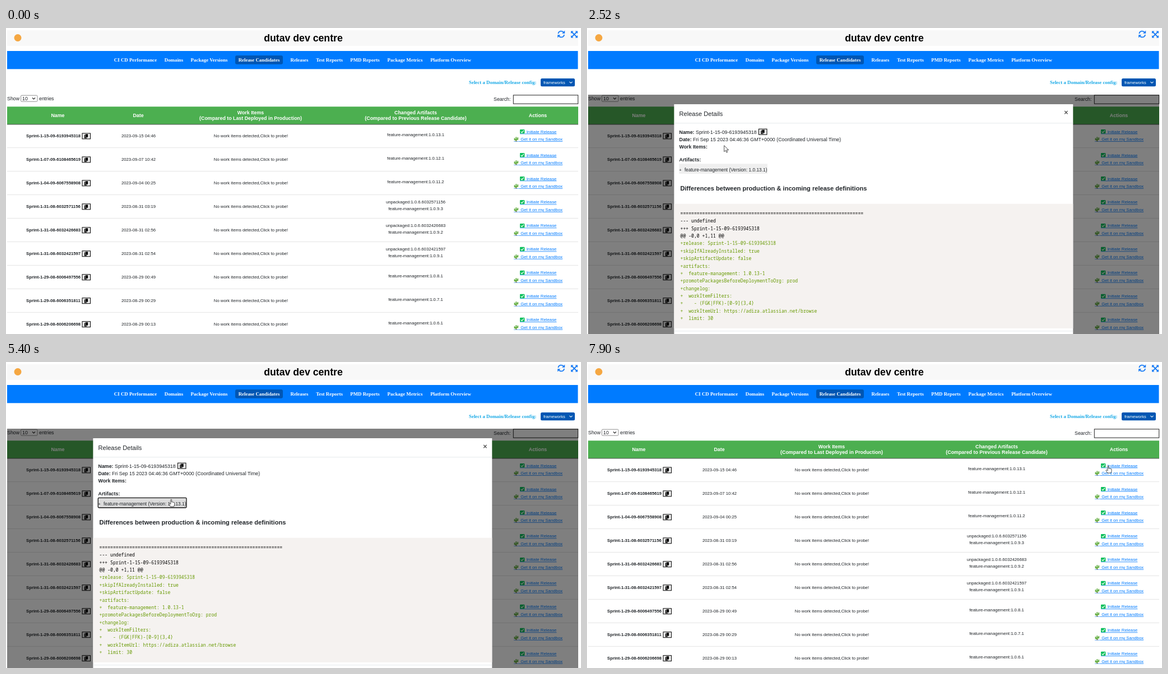
Recreate the animation shown at these times as an HTML page. Size 1026 by 546 pixels, loop 8000 ms.

```html
<!DOCTYPE html>
<html lang="en">
<head>
<meta charset="utf-8">
<title>Release candidates</title>
<style>
  html, body { margin: 0; width: 100%; height: 100%; overflow: hidden; background: #fff; }
  #stage { display: block; width: 100vw; height: 100vh; }
  text { font: 8.85px "Liberation Sans", Arial, sans-serif; fill: #212529; white-space: pre; }
  .bold { font-weight: bold; }
  .mid { text-anchor: middle; }
  .small { font-size: 7.74px; }
  .title { font-size: 17.7px; font-weight: bold; fill: #000; }
  .serif { font: bold 8.9px "Liberation Serif", Times, serif; }
  .white { fill: #fff; }
  .link { font-size: 7.8px; fill: #007bff; text-decoration: underline; }
  .large { font-size: 11.1px; }
  .notice { font-size: 13.34px; }
  .code { font: 8.15px "Noto Sans Mono", "DejaVu Sans Mono", monospace; fill: #000; }
  .added { fill: #690; }
</style>
</head>
<body>
<svg id="stage" viewBox="0 0 1026 546" xmlns="http://www.w3.org/2000/svg">
  <g id="page"></g>
  <svg id="frame" x="2" y="119" width="1019" height="427" viewBox="2 119 1019 427"></svg>
  <circle id="click" r="7.5" fill="#ffe600" opacity=".7"/>
  <path id="arrow" d="M0 0V11L2.6 8.7 4.3 12.5 6 11.7 4.4 8H8Z" fill="#fff" stroke="#222" stroke-width=".8"/>
  <path id="hand" d="M-.9 .6Q0-.5 .9 .6V5Q2 4.2 2.7 5.2 4 4.6 4.4 5.7 5.8 5.3 6 6.8V9.5L4.8 13H-1.2L-4 8.6Q-3.9 7.2-2.6 7.5L-.9 9Z" fill="#fff" stroke="#222" stroke-width=".8"/>
</svg>
<script>
const LOOP = 8000;
const $ = id => document.getElementById(id);
const text = (x, y, content, cls = "") =>
  `<text x="${x}" y="${y}" class="${cls}">${content.replace(/&/g, "&amp;")}</text>`;
const rect = (x, y, w, h, fill, more = "") =>
  `<rect x="${x}" y="${y}" width="${w}" height="${h}" fill="${fill}" ${more}/>`;
const path = (d, stroke, width, more = "") =>
  `<path d="${d}" fill="none" stroke="${stroke}" stroke-width="${width}" ${more}/>`;
const at = (x, y, content) => `<g transform="translate(${x} ${y})">${content}</g>`;
const chevron = (x, y, color) => path(`M${x - 2.5} ${y - 1.2}l2.5 2.5 2.5-2.5`, color, 1.1);

const copyButton = (x, y) => at(x, y,
  rect(.5, .5, 14.5, 10, "#efefef", 'stroke="#000"') +
  rect(4.3, 3, 4.5, 6.4, "#000", 'rx=".6"') +
  rect(6, 1.6, 5, 6.2, "#000", 'rx=".6" stroke="#efefef" stroke-width=".6"'));

const check = (x, y) => at(x, y,
  rect(0, 0, 8.4, 7.6, "#0bbf5b", 'rx="1"') + path("M1.7 3.9L3.5 5.8 6.9 1.7", "#fff", 1.2));

const cactus = (x, y) => at(x, y,
  path("M4.3 7.4V1M4.3 5.4H1.5V3M4.3 4.6H7.2V1.8", "#55a630", 1.7, 'stroke-linecap="round"') +
  path("M2.6 7.8H6", "#b98a4a", 1.2));

const NAV = [["CI CD Performance", 231], ["Domains", 299.5], ["Package Versions", 362.5],
  ["Release Candidates", 451.5], ["Releases", 523.5], ["Test Reports", 577],
  ["PMD Reports", 640.5], ["Package Metrics", 712], ["Platform Overview", 793.5]];

// sprint day, run id, date, package version, unpackaged build present
const ROWS = [
  ["15-09", "6193945318", "09-15 04:46", "13.1"],
  ["07-09", "6108465619", "09-07 10:42", "12.1"],
  ["04-09", "6067558908", "09-04 00:25", "11.2"],
  ["31-08", "6032571156", "08-31 03:19", "9.3", true],
  ["31-08", "6032426683", "08-31 02:56", "9.2", true],
  ["31-08", "6032421597", "08-31 02:54", "9.1", true],
  ["29-08", "6006497556", "08-29 00:49", "8.1"],
  ["29-08", "6006351811", "08-29 00:29", "7.1"],
  ["29-08", "6006206698", "08-29 00:13", "6.1"]];

function tableRow([day, id, date, version, unpackaged], i) {
  const feature = "feature-management:1.0." + version;
  const artifacts = unpackaged
    ? text(731, 122 - 7.2, "unpackaged:1.0.6." + id, "small mid") + text(731, 127.2, feature, "small mid")
    : text(731, 121, feature, "small mid");
  return at(0, 72.4 + 41.97 * i,
    text(36, 123, `Sprint-1-${day}-${id}`, "small bold") + copyButton(135.5, 115) +
    text(236.5, 122.6, "2023-" + date, "small mid") +
    text(437, 122.6, "No work items detected,Click to probe!", "small mid") + artifacts +
    check(917, 108.6) + text(926.5, 115.2, " Initiate Release", "link") +
    cactus(906, 121.6) + text(916, 128.6, " Get it on my Sandbox", "link") +
    path("M906 130H916M917 116.6H927", "#007bff", .6) +
    path("M2 141.2H1021", "#ddd", .8));
}

function page() {
  const sync = path("M-5.3-.8A5.3 5.3 0 0 1 4.4-3M5.3 .8A5.3 5.3 0 0 1-4.4 3", "#1a7cf5", 1.8) +
    '<path d="M6.5-6.5V-1.3H1.3ZM-6.5 6.5V1.3H-1.3Z" fill="#1a7cf5"/>';
  const expand = path("M-4.5-4.5L4.5 4.5M-4.5 4.5L4.5-4.5", "#1a7cf5", 1.8) +
    '<path d="M-6-6H-1.5L-6-1.5ZM6-6V-1.5L1.5-6ZM-6 6V1.5L-1.5 6ZM6 6H1.5L6 1.5Z" fill="#1a7cf5"/>';
  return rect(2, 4, 1019, 28, "#f8f8f8") +
    '<circle cx="21" cy="17.5" r="6.5" fill="#f5a742"/>' +
    text(530.5, 24, "dutav dev centre", "title mid") + at(990.7, 11, sync) + at(1014, 11.5, expand) +
    rect(2, 41, 1018.5, 32.3, "#007bff") + rect(409, 49, 85, 15.7, "#0056b3", 'rx="3"') +
    NAV.map(([label, x]) => text(x, 60, label, "serif white mid")).join("") +
    `<text x="826" y="100" class="serif" style="fill:#17a9e6">Select a Domain/Release config:</text>` +
    rect(954, 90, 61, 14.2, "#0056b3", 'rx="2.5"') +
    `<text x="959" y="99.8" class="white" style="font-size:7.5px">frameworks</text>` + chevron(1008, 97, "#fff") +
    text(2, 129, "Show") + rect(26.5, 120.2, 29.5, 11, "#fff", 'rx="1.5" stroke="#767676" stroke-width=".8"') +
    text(29, 129, "10") + chevron(49.5, 125.7, "#222") + text(59, 129, "entries") +
    text(870, 130, "Search:") + rect(905.3, 119.8, 115.4, 15.4, "#fff", 'stroke="#222"') +
    rect(2, 140.3, 1019, 31.5, "#4caf50") + path("M2 172H1021", "#222", .8) +
    [[92.5, 159, "Name"], [236, 159, "Date"], [436.5, 153.5, "Work Items"],
     [436.5, 164, "(Compared to Last Deployed in Production)"], [731, 153.5, "Changed Artifacts"],
     [731, 164, "(Compared to Previous Release Candidate)"], [949, 159, "Actions"]]
      .map(([x, y, label]) => text(x, y, label, "bold white mid")).join("") +
    ROWS.map(tableRow).join("");
}

const DIFF = `${"=".repeat(67)}
--- undefined
+++ Sprint-1-15-09-6193945318
@@ -0,0 +1,11 @@
+release: Sprint-1-15-09-6193945318
+skipIfAlreadyInstalled: true
+skipArtifactUpdate: false
+artifacts:
+  feature-management: 1.0.13-1
+promotePackagesBeforeDeploymentToOrg: prod
+changelog:
+  workItemFilters:
+    - (FGK|FFK)-[0-9]{3,4}
+  workItemUrl: https://adiza.atlassian.net/browse
+  limit: 30`.split("\n");

function dialog({ fade, height, hover, focus, closeFocus }) {
  if (!fade) return "";
  const scrollbar = height > 30;
  const left = scrollbar ? -2 : 0;
  const right = scrollbar ? 859.5 : 867.3;
  const notice = `<svg x="164" y="260" width="${right - 172.3}" height="${height}">` +
    rect(0, 0, 700, 46, "#efefef") +
    text(11.3, 12.7, "No diff/commit id's to display. The package build was triggered manually or some other process created a new", "notice") +
    text(11.3, 28.6, "version of the package, such as a change in sfdx-project.json or a runbook.", "notice") +
    '<circle cx="14" cy="40.6" r="4.2" fill="#111"/>' + path("M14 38V41.2M14 42.2V43.4", "#fff", 1.2) + "</svg>";
  const diff = DIFF.map((line, i) =>
    text(166.5, 334 + 13.37 * i, line, i > 3 ? "code added" : "code")).join("");
  const outline = focus ? 'stroke="#111" stroke-width="1.3" rx="1.5"' : "";
  const content =
    rect(155.4, 136, right - 155.4, 500, "#fff") + path(`M155.4 169.8H${right}`, "#dee2e6", .8) +
    text(164.5, 156.6, "Release Details", "large") +
    `<text x="${right - 12.5}" y="155.2" class="bold mid" style="font-size:12.5px;fill:#555">×</text>` +
    (closeFocus ? rect(841.6, 136, 25.4, 31, "none", 'stroke="#111" stroke-width="1.2" rx="1"') : "") +
    text(164.5, 188.5, "Name:", "bold") + text(194, 188.5, "Sprint-1-15-09-6193945318") + copyButton(306, 179.7) +
    text(164.5, 202, "Date:", "bold") +
    text(189, 202, "Fri Sep 15 2023 04:46:36 GMT+0000 (Coordinated Universal Time)") +
    text(164.5, 215.4, "Work Items:", "bold") + text(164.5, 237.5, "Artifacts:", "bold") + notice +
    rect(164.3, 242.3, 157.7, 17.7, hover ? "#dcdcdc" : "#efefef", outline) +
    `<text x="164.6" y="256" style="font-size:7.5px">+</text>` +
    `<text x="174" y="256" style="font-size:8.32px">feature-management (Version: 1.0.13.1)</text>` +
    at(0, height, text(166.5, 290, "Differences between production & incoming release definitions", "large bold") +
      rect(155.4, 313.7, right - 155.4, 222.3, "#f5f2f0") + diff +
      path(`M155.4 540.8H${right}`, "#dee2e6", .8));
  const bar = rect(1009.5, 119, 11.5, 427, "#f1f1f1") + rect(1010.5, 131, 9.5, 420, "#c1c1c1") +
    '<path d="M1012.6 127L1015.2 124 1017.8 127Z" fill="#505050"/>';
  return `<g opacity="${fade}">` + rect(2, 119, 1019, 427, "#000", 'opacity=".5"') +
    at(left, -27 * (1 - fade), content) + (scrollbar ? bar : "") + "</g>";
}

// [time, value]: the value holds until the next entry
const FADE = [[0, 0], [2320, .4], [2400, .8], [2520, 1], [6880, .4], [6950, 0]];
const HEIGHT = [[0, 0], [3940, 8], [3990, 24], [4080, 42], [4140, 45.4],
  [5190, 34], [5260, 18], [5330, 6], [5400, 0]];
const CLICKS = [[2320, 2400], [3940, 3990], [5060, 5190], [6750, 6880]];
const CURSOR = [[430, 731, 433], [490, 712, 335], [560, 685, 356], [830, 685, 356], [970, 225, 271],
  [1250, 225, 271], [1660, 244.7, 209.7], [3180, 244.7, 209.7], [3790, 247, 255.5],
  [5330, 247, 255.5], [5730, 820, 129], [5930, 820, 129], [6080, 867, 147], [6200, 859, 150.5],
  [7210, 859, 150.5], [7900, 930, 185]];

const held = (track, t) => track.filter(([time]) => time <= t).pop()[1];

function cursorAt(t) {
  const next = CURSOR.findIndex(([time]) => time > t);
  if (next < 1) return CURSOR[next < 0 ? CURSOR.length - 1 : 0].slice(1);
  const [t0, x0, y0] = CURSOR[next - 1], [t1, x1, y1] = CURSOR[next];
  const u = (t - t0) / (t1 - t0), eased = u * u * (3 - 2 * u);
  return [x0 + (x1 - x0) * eased, y0 + (y1 - y0) * eased];
}

let shown = "";
function render(t) {
  const [x, y] = cursorAt(t);
  const inside = (l, top, r, bottom) => x > l && x < r && y > top && y < bottom;
  const fade = held(FADE, t);
  const hover = fade === 1 && inside(163, 242, 322, 260);
  const onLink = fade ? inside(841, 136, 867, 167) : inside(917, 180, 983, 189);
  const state = { fade, height: held(HEIGHT, t), hover, focus: t >= 3940 && t < 6750, closeFocus: t >= 6750 };
  const key = JSON.stringify(state);
  if (key !== shown) {
    $("frame").innerHTML = dialog(state);
    shown = key;
  }
  const place = (id, visible) => {
    $(id).setAttribute("transform", `translate(${x} ${y})`);
    $(id).setAttribute("visibility", visible ? "visible" : "hidden");
  };
  const hand = hover || onLink;
  place("arrow", t >= 430 && !hand);
  place("hand", t >= 430 && hand);
  place("click", CLICKS.some(([start, end]) => t >= start && t < end));
}

$("page").innerHTML = page();
const start = performance.now();
function tick() {
  render((performance.now() - start) % LOOP);
  requestAnimationFrame(tick);
}
tick();
</script>
</body>
</html>
```
